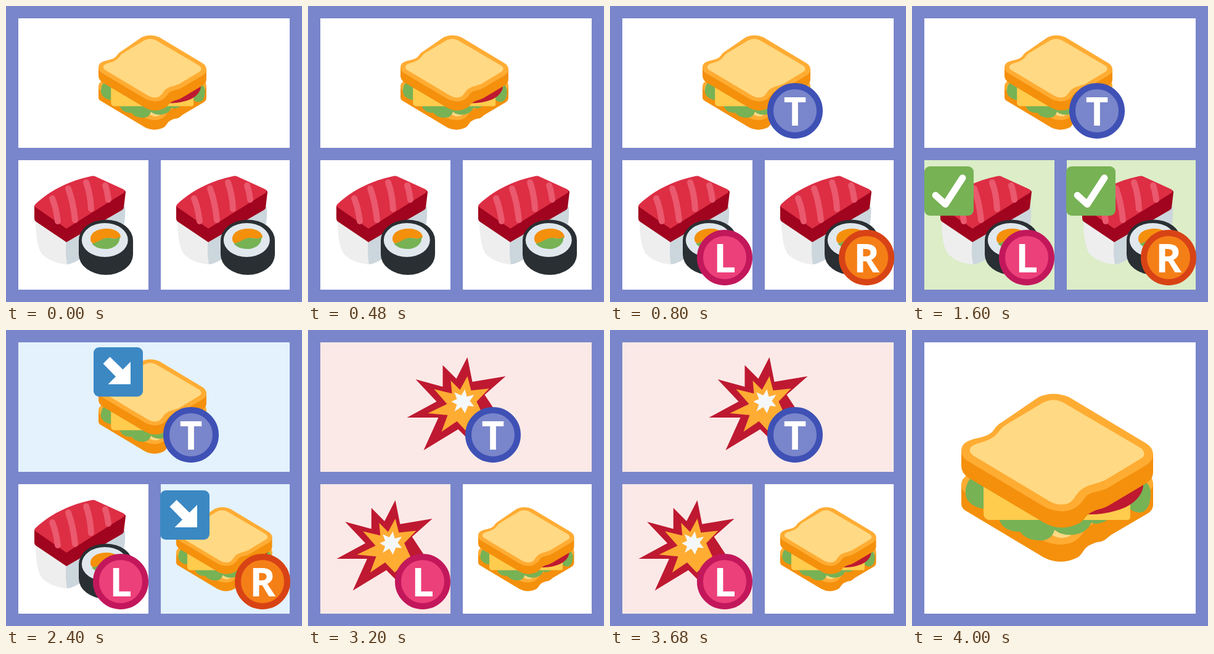
An HTML page that plays this animation: 480x480 px, repeating every 4800 ms.

```html
<!DOCTYPE html>
<html lang="en">
<head>
<meta charset="utf-8">
<title>Tile merge</title>
<style>
  html, body { margin: 0; height: 100%; overflow: hidden; background: #7986cb; }
  svg { display: block; width: 100vw; height: 100vh; }
  text { font: bold 64px "Noto Sans", "Open Sans", sans-serif; fill: #fff; text-anchor: middle; }
</style>
</head>
<body>
<svg viewBox="0 0 480 480">
  <defs>
    <g id="sandwich" transform="translate(-80 -80)">
      <path fill="#f4900c" d="M80 250V282Q80 289 87 293L214 369Q242 383 270 368C282 357 276 352 300 344C314 343 315 337 325 331L383 297Q391 292 391 283V247Z"/>
      <path fill="#ffac33" d="M80 250Q80 240 92 234H384Q391 240 391 250Q391 258 380 264L325 300C310 312 300 308 285 320C272 333 272 345 243 348Q226 348 212 341L88 265Q80 260 80 250Z"/>
      <path fill="#ffd983" d="M213 324L228 333Q243 341 256 334L270 318Z"/>
      <g fill="#77b255">
        <path d="M97 238C85 250 84 270 92 278Q100 288 118 290V248Z"/>
        <path d="M375 244Q387 250 387 265C387 285 379 296 369 296Q361 296 353 290V262Z"/>
        <path d="M141 306Q147 327 175 327Q187 343 213 341Q228 338 231 324Q243 334 261 332Q283 330 291 312Q294 315 301 314Q313 312 319 306Z"/>
      </g>
      <path fill="#ffcc4d" d="M116 250V299Q117 306 124 308H350Q354 307 354 303V255Z"/>
      <path fill="#be1931" d="M375 245C377 262 366 278 345 288C320 298 300 300 270 299L300 265Z"/>
      <path fill="#f4900c" d="M80 196V221Q80 232 92 240L215 313Q243 328 272 313C284 305 280 298 302 291Q312 289 320 284L379 249Q391 242 391 231V200Z"/>
      <path fill="#ffac33" d="M80 196C80 182 94 178 108 175C138 168 128 160 145 150L205 109Q229 98 255 109L380 184Q391 191 391 202Q391 212 380 219L321 254C305 264 293 260 282 270C272 285 262 294 242 294Q225 293 212 285L88 211Q80 205 80 196Z"/>
      <path fill="#ffd983" d="M94 194C96 184 112 184 124 178C142 170 138 163 152 154L212 118Q229 109 246 118L372 192Q381 202 372 208L314 243C300 250 285 250 273 260C262 270 262 283 242 283Q232 283 222 277L100 204Q93 199 94 194Z"/>
    </g>

    <g id="sushi" transform="translate(-46 -276)">
      <path fill="#eee" d="M48 345C48 372 51 395 60 404Q75 417 97 419L104 418V370Z"/>
      <path fill="#ccd6dd" d="M98 378C96 395 97 408 99 419Q106 418 112 415L180 380Q195 362 193 325Z"/>
      <path fill="#a0041e" d="M46 324V345Q46 348 49 350L98 383L188 331Q191 329 191 327L194 302Q194 299 190 298Z"/>
      <path fill="#dd2e44" d="M46 325Q46 323 48 321C74 297 105 283 138 276Q141 275 144 276L190 297Q194 299 191 303L98 361Z"/>
      <path fill="none" stroke="#ea596e" stroke-width="10" stroke-linecap="round" d="M75 312Q81 326 84 349M101 296Q109 318 112 347M130 286Q137 306 138 329M161 291Q164 299 166 314"/>
      <path fill="#292f33" d="M118 380A44 33.5 0 0 1 206 380V403A44 33 0 0 1 118 403Z"/>
      <ellipse cx="160.300" cy="379.500" rx="37.500" ry="27.500" fill="#e1e8ed"/>
      <path fill="#f4900c" d="M137 379C136 366 151 361 163 361C176 361 186 367 186 375Q183 379 174 377C160 375 153 381 145 385Q138 386 137 379Z"/>
      <path fill="#77b255" d="M139 385C150 384 156 375 168 376Q180 379 184 374C186 386 174 394 162 394C150 394 143 390 139 385Z"/>
    </g>

    <g id="blast">
      <path fill="#be1931" d="M98 0L106 40L160 31L126 61L145 90L102 136L83 117L27 151L51 98L0 98L48 72L14 36L58 48V13L80 35Z"/>
      <path fill="#ffac33" d="M98 31L104 54L133 51L113 72L124 96L97 121L81 104L56 121L66 94L34 91L65 76L44 52L73 59L71 38L86 53Z"/>
      <path fill="#f5f8fa" d="M94 52L97 64L109 61L102 71L109 80L99 79L94 91L88 81L77 88L81 77L72 72L81 68L77 57L88 62Z"/>
    </g>

    <g id="check">
      <rect width="80" height="80" rx="9" fill="#77b255"/>
      <path fill="none" stroke="#fff" stroke-width="11" stroke-linecap="round" stroke-linejoin="round" d="M18.200 47L34.200 61.500L62 18.800"/>
    </g>

    <g id="arrow">
      <rect width="80" height="80" rx="9" fill="#3b88c3"/>
      <path fill="#fff" d="M60 60V23.500L47.500 36L26.500 15.500L15.500 26.500L36 47.500L23.500 60Z"/>
    </g>
  </defs>
</svg>

<script>
const STEP = 800, COUNT = 6;
const svg = document.querySelector('svg');
const parts = [];

function add(steps, tag, attrs, parent = svg) {
  const el = document.createElementNS('http://www.w3.org/2000/svg', tag);
  for (const key in attrs) el.setAttribute(key, attrs[key]);
  parent.append(el);
  if (steps) parts.push({ el, steps });
  return el;
}

const panel = (steps, [x, y, width, height], fill) =>
  add(steps, 'rect', { x, y, width, height, fill });

const icon = (steps, name, x, y, scale = 1) =>
  add(steps, 'use', { href: '#' + name, transform: `translate(${x} ${y}) scale(${scale})` });

function badge(steps, letter, x, y, fill, stroke) {
  const g = add(steps, 'g', { transform: `translate(${x} ${y})` });
  add(null, 'circle', { r: 40, fill, stroke, 'stroke-width': 10 }, g);
  add(null, 'text', { y: 23.5 }, g).textContent = letter;
}

const TOP = [20, 20, 440, 210], LEFT = [20, 250, 211, 210], RIGHT = [251, 250, 209, 210];
const MATCH = '#dcedc8', MOVE = '#e3f2fd', CLEAR = '#fbe9e7';

// The first argument lists the steps in which a part is visible.
panel([0, 1, 2], TOP, '#fff');
panel([3], TOP, MOVE);
panel([4], TOP, CLEAR);
panel([0, 1, 3], LEFT, '#fff');
panel([2], LEFT, MATCH);
panel([4], LEFT, CLEAR);
panel([0, 1, 4], RIGHT, '#fff');
panel([2], RIGHT, MATCH);
panel([3], RIGHT, MOVE);
panel([5], [20, 20, 440, 440], '#fff');

icon([0, 1, 2, 3], 'sandwich', 150, 34.3, 0.5625);
icon([4], 'blast', 160.5, 44);
icon([0, 1, 2, 3], 'sushi', 46, 276);
icon([4], 'blast', 46.5, 276, 0.97);
icon([0, 1, 2], 'sushi', 276, 276);
icon([3, 4], 'sandwich', 276, 275.5, 0.5);
icon([5], 'sandwich', 80, 80);

icon([2], 'check', 20, 260);
icon([2], 'check', 250, 260);
icon([3], 'arrow', 142, 28);
icon([3], 'arrow', 250, 260);

badge([1, 2, 3, 4], 'T', 300, 170, '#7986cb', '#3f51b5');
badge([1, 2, 3, 4], 'L', 186, 408, '#ec407a', '#c2185b');
badge([1, 2, 3], 'R', 416, 408, '#f57f17', '#d84315');

let shown = -1;
function draw() {
  const step = Math.floor(performance.now() / STEP) % COUNT;
  if (step !== shown) {
    shown = step;
    for (const { el, steps } of parts) el.style.display = steps.includes(step) ? '' : 'none';
  }
  requestAnimationFrame(draw);
}
draw();
</script>
</body>
</html>
```
